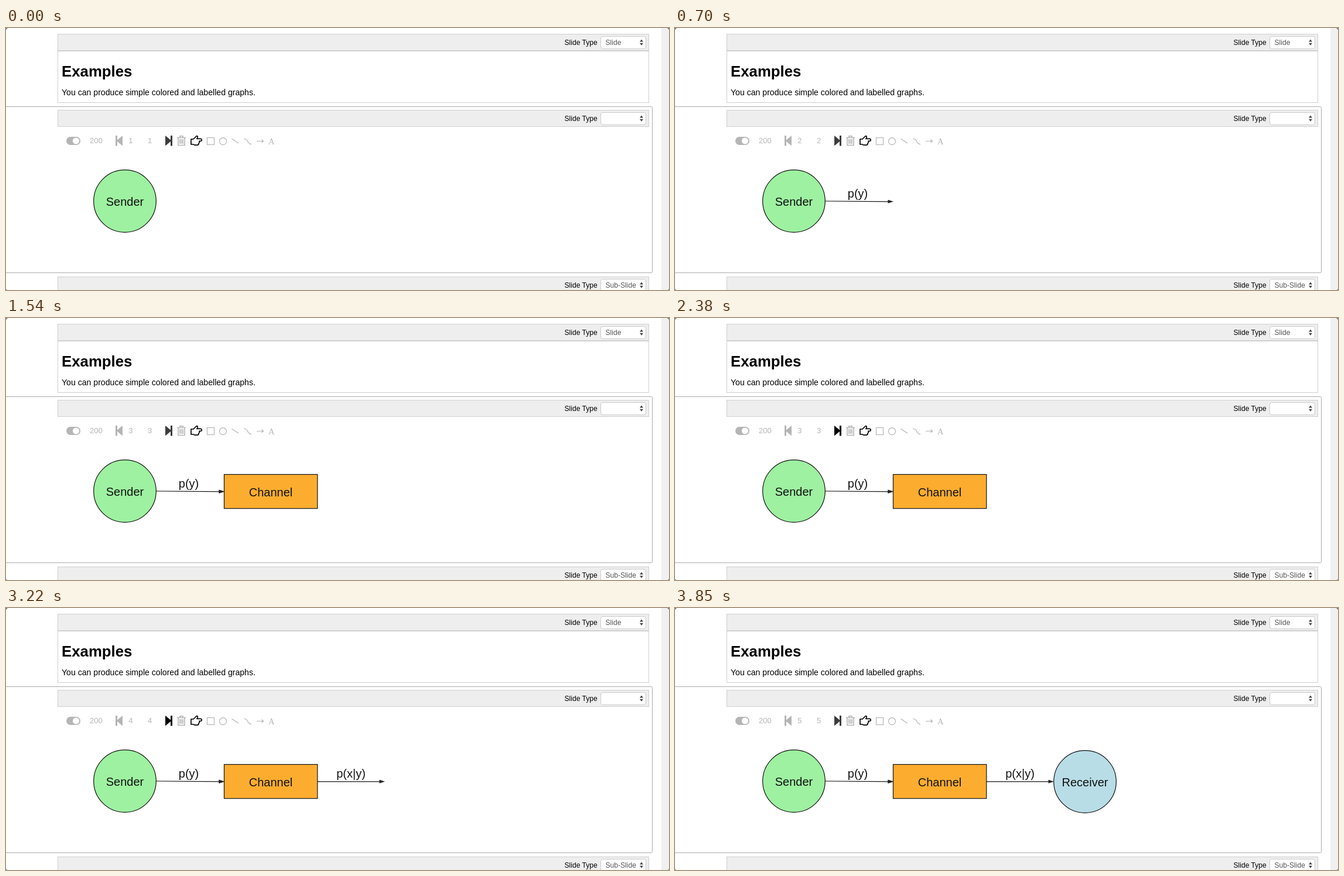
These frames come from a looping animation (1132 px wide and 448 px high, 3920 ms). An HTML page:

```html
<!DOCTYPE html>
<html lang="en">
<head>
<meta charset="utf-8">
<title>Slide graph</title>
<style>
html, body { margin: 0; width: 100%; height: 100%; overflow: hidden; background: #fff; }
svg { display: block; font-family: "Liberation Sans", Arial, sans-serif; }
.stage { width: 1132px; height: 448px; }
.line { fill: none; stroke: #cfcfcf; }
.bar { fill: #eee; stroke: #cfcfcf; }
.select { fill: #fff; stroke: #ccc; }
.small { font-size: 12.1px; }
.value { fill: #555; }
.graph { font-size: 20px; text-anchor: middle; fill: #111; }
.shape { stroke: #111; stroke-width: 1.2; }
.tools { fill: #b5b5b5; font-size: 13px; }
.tool { fill: none; stroke: #b5b5b5; stroke-width: 1.2; }

.step, .digits, .next { animation: 3920ms step-end infinite; }
.second { animation-name: second; }
.third { animation-name: third; }
.fourth { animation-name: fourth; }
.fifth { animation-name: fifth; }
.digits { animation-name: count; }
.next { animation-name: press; fill: #3c3c3c; }

@keyframes second { 0% { opacity: 0 } 16.07%, 100% { opacity: 1 } }
@keyframes third { 0% { opacity: 0 } 39.28%, 100% { opacity: 1 } }
@keyframes fourth { 0% { opacity: 0 } 62.49%, 100% { opacity: 1 } }
@keyframes fifth { 0% { opacity: 0 } 85.71%, 100% { opacity: 1 } }
@keyframes count {
  0% { transform: translateY(0) }
  16.07% { transform: translateY(-30px) }
  39.28% { transform: translateY(-60px) }
  62.49% { transform: translateY(-90px) }
  85.71%, 100% { transform: translateY(-120px) }
}
@keyframes press {
  0%, 16.07%, 39.28%, 62.49%, 85.71%, 100% { fill: #3c3c3c }
  8.92%, 32.14%, 55.35%, 78.57% { fill: #000 }
}
</style>
</head>
<body>
<svg class="stage" viewBox="0 0 1132 448">
  <defs>
    <g id="header">
      <rect class="bar" x="88.5" y=".5" width="1009" height="28"/>
      <text class="small" x="953.5" y="19">Slide Type</text>
      <rect class="select" x="1015.5" y="4.5" width="77" height="21" rx="3.5"/>
      <path d="M1082 13.4l3-4 3 4zm0 2.4l3 4 3-4z" fill="#444"/>
    </g>
    <path id="skip" d="M0 0h3v7.4L12 0v17.5L3 10v7.5H0z"/>
    <path id="head" d="M0 0l-9.5-3v6z" fill="#222"/>
  </defs>

  <rect x="1119" width="13" height="448" fill="#f0f0f0"/>
  <path d="M0 0h3L0 3zM1132 0v3l-3-3zM0 448v-2l2 2zM1132 448v-2l-2 2z" fill="#777"/>

  <rect class="line" x="88.5" y="10.5" width="1009" height="117"/>
  <use href="#header" y="10"/>
  <path class="line" d="M88 39.5h1010"/>
  <text class="small value" x="1023.5" y="29">Slide</text>
  <text x="95" y="83" font-size="25.8" font-weight="bold">Examples</text>
  <text x="95" y="115" font-size="14.1">You can produce simple colored and labelled graphs.</text>

  <rect class="line" x="-5" y="134.5" width="1108.5" height="284" rx="2" style="stroke:#ababab"/>
  <use href="#header" y="140"/>

  <path class="line" d="M88.5 425v30M1097.5 425v30"/>
  <use href="#header" y="425"/>
  <text class="small value" x="1023.5" y="444">Sub-Slide</text>

  <g class="tools">
    <rect x="103" y="186" width="24" height="14" rx="7"/>
    <circle cx="119.5" cy="193" r="5.6" fill="#fff"/>
    <text x="143" y="197">200</text>
    <use href="#skip" x="187" y="184"/>
    <svg x="205" y="180" width="55" height="26">
      <g class="digits">
        <text x="4.3" y="17">1<tspan x="4.3" dy="30">2</tspan><tspan x="4.3" dy="30">3</tspan><tspan x="4.3" dy="30">4</tspan><tspan x="4.3" dy="30">5</tspan></text>
        <text x="37" y="17">1<tspan x="37" dy="30">2</tspan><tspan x="37" dy="30">3</tspan><tspan x="37" dy="30">4</tspan><tspan x="37" dy="30">5</tspan></text>
      </g>
    </svg>
    <use class="next" href="#skip" transform="translate(284 184) scale(-1 1)"/>
    <g class="tool" stroke-width="1.5">
      <path d="M292 187.5h15M297 187v-2.3h5v2.3M294 188v12.5h11V188M297 190v8M299.5 190v8M302 190v8" style="stroke-width:1.6"/>
      <rect x="343.5" y="187.5" width="12" height="12"/>
      <circle cx="370.5" cy="193.7" r="6"/>
      <path d="M385.5 189.5l11.5 7.5M406 189.5q5 0 6.5 4t6.5 5.5M428 193.5h11.5M436.5 190.8l3 2.7-3 2.7"/>
    </g>
    <text x="448" y="199" font-size="14.5" style="font-family:'Liberation Serif',serif">A</text>
  </g>
  <path d="M316 190h4l5-5q2-1 2.3.8 0 1.5-1.5 3.6h6.5q2 .3 2 2t-2 2H330q1 3-1 3.6.3 2.6-2 3.2h-4.5l-2.7-1.2H316z" fill="#fff" stroke="#000" stroke-width="1.7" stroke-linejoin="round"/>

  <g class="graph">
    <g class="step second">
      <path class="shape" d="M256 296l112 .8"/>
      <use href="#head" x="373" y="296.8"/>
      <text x="312" y="290">p(y)</text>
    </g>
    <circle class="shape" cx="203" cy="296" r="53.3" fill="#9ef1a1"/>
    <text x="203" y="303.5">Sender</text>
    <g class="step third">
      <rect class="shape" x="372.5" y="267.5" width="159.3" height="58.2" fill="#fcad2f"/>
      <use class="step second" href="#head" x="373" y="296.8"/>
      <text x="452" y="304.5">Channel</text>
    </g>
    <g class="step fourth">
      <path class="shape" d="M532 296.8h110"/>
      <use href="#head" x="647" y="296.8"/>
      <text x="589" y="290">p(x|y)</text>
    </g>
    <g class="step fifth">
      <circle class="shape" cx="700" cy="297" r="53.3" fill="#b8dde7"/>
      <text x="700" y="304.5">Receiver</text>
    </g>
  </g>
</svg>
</body>
</html>
```
